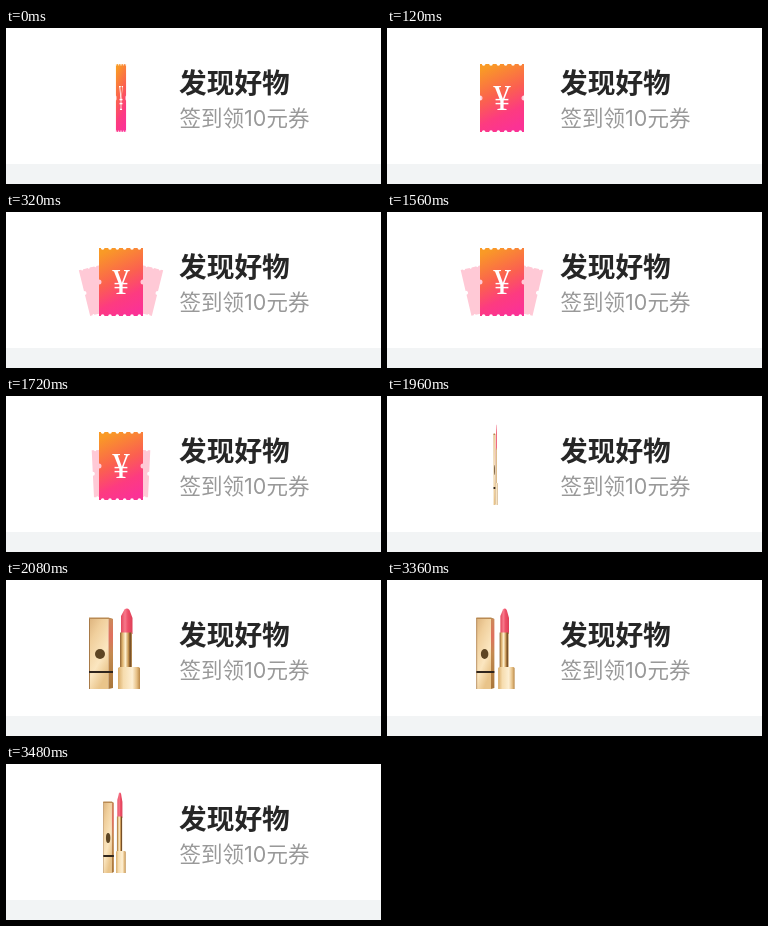
An HTML page that plays this animation: 375x156 px, repeating every 3.52 s.

```html
<!DOCTYPE html>
<html lang="zh-CN">
<head>
<meta charset="utf-8">
<style>
  html, body { margin: 0; width: 100%; height: 100%; overflow: hidden; background: #fff; }
  svg { display: block; width: 375px; height: 156px; }
  text { font-family: "Noto Sans CJK SC", "Noto Sans CJK", sans-serif; }
  .title { font-size: 27.7px; font-weight: 700; fill: #262626; }
  .sub { font-family: Inter, "Noto Sans CJK SC", "Noto Sans CJK", sans-serif; font-size: 21.5px; fill: #999; }
  .yen { font: 35px "Liberation Serif", serif; fill: #fff; text-anchor: middle; }
</style>
</head>
<body>
<svg viewBox="0 0 375 156">
  <defs>
    <linearGradient id="ticketFill" x1=".3" y1="0" x2=".6" y2="1">
      <stop offset="0" stop-color="#f99a26"/>
      <stop offset=".45" stop-color="#fb6050"/>
      <stop offset=".75" stop-color="#fd3b80"/>
      <stop offset="1" stop-color="#fb3295"/>
    </linearGradient>
    <linearGradient id="capFill" x2=".5" y2="1">
      <stop offset="0" stop-color="#dcb27c"/>
      <stop offset=".3" stop-color="#f0cf9c"/>
      <stop offset=".7" stop-color="#fbe6c0"/>
      <stop offset="1" stop-color="#e9c48a"/>
    </linearGradient>
    <linearGradient id="capSideFill" x2="0" y2="1">
      <stop offset="0" stop-color="#c98a58"/>
      <stop offset=".25" stop-color="#e0705f"/>
      <stop offset=".5" stop-color="#c48a50"/>
      <stop offset="1" stop-color="#a8763a"/>
    </linearGradient>
    <linearGradient id="tubeFill">
      <stop offset="0" stop-color="#8f6232"/>
      <stop offset=".2" stop-color="#dcb06c"/>
      <stop offset=".45" stop-color="#fff1d0"/>
      <stop offset=".7" stop-color="#c89550"/>
      <stop offset=".85" stop-color="#6b4520"/>
      <stop offset="1" stop-color="#c79a5c"/>
    </linearGradient>
    <linearGradient id="baseFill">
      <stop offset="0" stop-color="#d9ac68"/>
      <stop offset=".25" stop-color="#f6dcae"/>
      <stop offset=".65" stop-color="#fdefd3"/>
      <stop offset=".85" stop-color="#e6c085"/>
      <stop offset="1" stop-color="#b98848"/>
    </linearGradient>
    <linearGradient id="bulletFill">
      <stop offset="0" stop-color="#e2465c"/>
      <stop offset=".35" stop-color="#f7788a"/>
      <stop offset=".6" stop-color="#ee4f68"/>
      <stop offset="1" stop-color="#dd4058"/>
    </linearGradient>
  </defs>

  <rect y="136" width="375" height="20" fill="#f2f4f5"/>
  <text class="title" x="173" y="65">发现好物</text>
  <text class="sub" x="173.6" y="97.6">签到领10元券</text>

  <g id="ticket">
    <path class="side" fill="#ffc9d6"/>
    <path class="side" fill="#ffc9d6"/>
    <path id="front" fill="url(#ticketFill)"/>
    <text class="yen" y="82">¥</text>
  </g>

  <g id="lipstick">
    <path d="M-25.500 38H-6V109H-25.500Z" fill="url(#capFill)"/>
    <path d="M-6 38L-1.500 39V108L-6 109Z" fill="url(#capSideFill)"/>
    <path d="M-25.500 38H-24.500V109H-25.500Z" fill="#a87a48"/>
    <path d="M-25.500 37.500H-6L-1.500 39H-25.500Z" fill="#b98a52"/>
    <path d="M-25.500 91H-1.500V93H-25.500Z" fill="#30251c"/>
    <circle cx="-14.500" cy="74" r="5" fill="#5d4524"/>
    <path d="M6.500 54V36L10 29.500Q12.500 27.500 15 30L18 38V54Z" fill="url(#bulletFill)"/>
    <path d="M5.500 52.500H17.500V88H5.500Z" fill="url(#tubeFill)"/>
    <path d="M3.500 88L5 87H24L25.500 88V109H3.500Z" fill="url(#baseFill)"/>
  </g>
</svg>

<script>
const LOOP = 3520, STEP = 40;
const ticket = document.getElementById('ticket');
const lipstick = document.getElementById('lipstick');
const front = document.getElementById('front');
const sides = [...document.querySelectorAll('.side')];

// Ticket outline centred on the origin, with round bites along every edge.
function ticketPath(w, h, teeth, r, notch) {
  const row = dir => {
    const flat = dir * (w / teeth / 2 - r);
    return `h${flat}a${r} ${r} 0 0 0 ${dir * 2 * r} 0h${flat}`.repeat(teeth);
  };
  const edge = dir => {
    const flat = dir * (h / 2 - notch);
    return `v${flat}a${notch} ${notch} 0 0 0 0 ${dir * 2 * notch}v${flat}`;
  };
  return `M${-w / 2} ${-h / 2}${row(1)}${edge(1)}${row(-1)}${edge(-1)}z`;
}

// Piecewise linear value through [time, value] points.
function track(t, points) {
  const i = points.findIndex(p => p[0] > t);
  if (i === 0) return points[0][1];
  if (i < 0) return points[points.length - 1][1];
  const [t0, a] = points[i - 1], [t1, b] = points[i];
  return a + (b - a) * (t - t0) / (t1 - t0);
}

const smooth = p => p * p * (3 - 2 * p);

function flip(group, x, scale) {
  group.style.display = scale > 0 ? '' : 'none';
  group.setAttribute('transform', `translate(${x} 0) scale(${scale} 1)`);
}

function draw(t) {
  const ticketTurn = t < 1960 ? track(t, [[0, .23], [120, 1], [1840, 1], [1960, 0]]) : 0;
  const lipstickTurn = t < 1960 ? 0 :
    track(t, [[1950, 0], [2080, 1], [3320, 1], [3360, .75], [3480, .44], [3520, .3]]);
  flip(ticket, 115, ticketTurn);
  flip(lipstick, 108.5, lipstickTurn);

  const tuck = track(t, [[80, 0], [160, 1], [1800, 1], [1840, 0]]);
  const fan = smooth(track(t, [[120, 0], [320, 1], [1520, 1], [1800, 0]]));
  sides.forEach((side, i) => {
    const dir = i ? 1 : -1;
    side.setAttribute('transform',
      `translate(${dir * (9 * tuck + 11 * fan)} 77) rotate(${dir * 14 * fan})`);
  });
}

front.setAttribute('d', ticketPath(44, 68, 6, 1.8, 2.5));
front.setAttribute('transform', 'translate(0 70)');
sides.forEach(side => side.setAttribute('d', ticketPath(34, 47, 5, 1, 2)));

const start = performance.now();
function tick() {
  const t = (performance.now() - start) % LOOP;
  draw(Math.floor(t / STEP) * STEP);
  requestAnimationFrame(tick);
}
tick();
</script>
</body>
</html>
```
